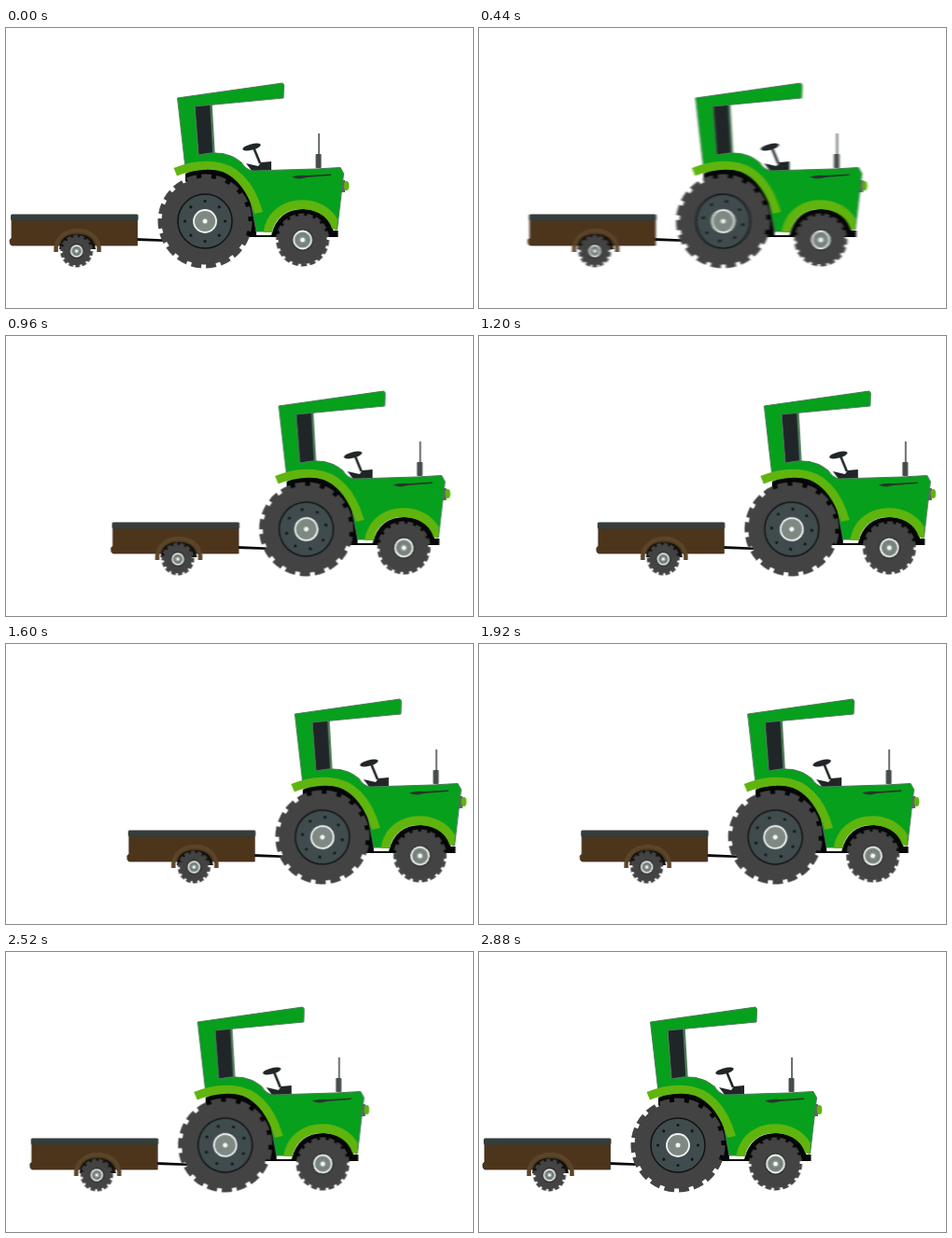
These frames come from a looping animation (500x300 px, 3.12 s). An HTML page:

```html
<!DOCTYPE html>
<html lang="en">
<head>
<meta charset="utf-8">
<title>Tractor</title>
<style>
html, body { margin: 0; width: 100%; height: 100%; overflow: hidden; background: #fff; }
svg { display: block; width: 500px; height: 300px; }
#rig { animation: drive 3120ms infinite; }
.spin { animation: roll 3120ms infinite; transform-origin: 0 0; }
@keyframes drive {
  0% { transform: translateX(0); animation-timing-function: cubic-bezier(.25, .1, .49, 1); }
  46.154%, 50% { transform: translateX(126px); animation-timing-function: cubic-bezier(.364, 0, .636, 1); }
  92.308%, 100% { transform: translateX(0); }
}
@keyframes roll {
  0% { transform: rotate(0); animation-timing-function: cubic-bezier(.25, .1, .49, 1); }
  46.154%, 50% { transform: rotate(var(--turn)); animation-timing-function: cubic-bezier(.364, 0, .636, 1); }
  92.308%, 100% { transform: rotate(0); }
}
.tire { fill: #434343; }
.green { fill: #06a01c; stroke: #4b7a58; stroke-width: 1; stroke-linejoin: round; }
.lime { fill: #60b40e; }
.dark { fill: #202628; }
</style>
</head>
<body>
<svg viewBox="0 0 500 300">
  <filter id="motion" filterUnits="userSpaceOnUse" x="-10" y="40" width="400" height="230"
    color-interpolation-filters="sRGB">
    <feGaussianBlur id="blur" stdDeviation="0 0"/>
  </filter>
  <g id="rig"><g filter="url(#motion)">
    <!-- trailer -->
    <path d="M139 225L172 226.5V229L139 228Z" fill="#080808"/>
    <path d="M6 206H140.500V233H6Q3.500 232 4 227L6 225Z" fill="#4d351b" stroke="#3a2a1c" stroke-width=".8"/>
    <rect x="5" y="199.500" width="136.500" height="7" rx="1.500" fill="#353d3a"/>
    <path d="M57 237Q58 221 76 221Q94 221 96 237Z" fill="#11100e"/>
    <path d="M53.500 240V235C56 211 97 211 99.500 235V240" fill="none" stroke="#5a4529" stroke-width="4.500"/>
    <g id="cart" transform="translate(75.500 239)"></g>

    <!-- chassis and wheel wells -->
    <path d="M192 156Q211 147 232 153Q256 162 267 197L268 222H350V217H355.500V224H255L230 200L192 164Z" fill="#050606"/>
    <path d="M284 222Q291 194 318 194Q345 194 352 222Z" fill="#050606"/>

    <!-- steering -->
    <path d="M257 145L270 148L273 144L284 143V153H263Z" class="dark"/>
    <path d="M265 128L272 145" stroke="#202628" stroke-width="2.600"/>
    <ellipse cx="263" cy="127.500" rx="10" ry="3.200" class="dark" transform="rotate(-14 263 127.500)"/>

    <!-- exhaust -->
    <path d="M335 113V137" stroke="#5b6060" stroke-width="1.800"/>
    <rect x="331.500" y="135" width="6" height="15" rx="1" fill="#464c4c"/>

    <!-- cab and hood -->
    <path d="M202 83L219 82L222 136H206Z" fill="#202628"/>
    <path d="M219.500 82L222.500 135" stroke="#4b7a58" stroke-width="2.500"/>
    <path class="green" d="M183.500 75L296 59L297.500 61L297 75L202 84L206 136
      Q235 129 252 144Q257 152 264 153L331 151L358 149.500L361.500 156L354.500 216
      L340 194Q318 184 296 195L279 218H268L262 186Q246 151 213 149L192 150Z"/>
    <path class="lime" d="M179.500 150Q201 141 221 143Q260 146 275 197L266 199
      Q255 163 232 154Q211 148 183 158.500Z"/>
    <path class="lime" d="M275.500 219C282 176 339 175 355 205L354 217L349 215
      C342 189 292 184 285 219Z"/>
    <path d="M306 159.500Q313 157 322 158L348 156.500V158L322 160Q313 163 306 159.500Z" fill="#27352c"/>
    <path d="M360 163H363V176H359Z" fill="#596660"/>
    <ellipse cx="364.500" cy="169" rx="2.800" ry="5" class="lime"/>

    <g id="rear" transform="translate(213 207)"></g>
    <g id="front" transform="translate(317.500 227)"></g>
  </g></g>
</svg>
<script>
const circle = (r, attrs) => `<circle r="${r}" ${attrs}/>`;

function wheel(id, radius, teeth, hub, rim) {
  const turn = 126 / radius * 180 / Math.PI;
  const depth = radius > 40 ? 5 : 3;
  let parts = circle(radius - depth * .8, 'class="tire"');
  parts += circle(radius - depth / 2, `fill="none" stroke="#434343" stroke-width="${depth}"
    pathLength="${teeth * 10}" stroke-dasharray="6.800 3.200"`);
  if (rim) {
    parts += circle(rim, 'fill="#404b4d" stroke="#101414" stroke-width="1.500"');
    for (let a = 0; a < 360; a += 45)
      parts += `<circle cy="-21.500" r="1.600" fill="#121819" transform="rotate(${a})"/>`;
  } else {
    parts += circle(hub + 2, 'fill="#292d2c"');
  }
  parts += circle(hub, `fill="#7f8983" stroke="#f4f6f4" stroke-width="${hub > 7 ? 1.8 : 1.5}"`);
  if (!rim)
    parts += circle(hub * .62, 'fill="none" stroke="#606a64" stroke-width="1" stroke-dasharray="2 1.500"');
  parts += circle(hub > 7 ? 2.5 : 1.7, 'fill="#f4f6f4"');
  document.getElementById(id).innerHTML =
    `<g class="spin" style="--turn:${turn}deg">${parts}</g>`;
}

wheel('rear', 50.500, 19, 12, 29);
wheel('front', 28.500, 18, 9.5);
wheel('cart', 17.500, 14, 6);

// Horizontal motion blur, strongest mid-trip and gone at the stops
const blur = document.getElementById('blur');
const bump = (t, from, to) =>
  t > from && t < to ? Math.sin(Math.PI * (t - from) / (to - from)) : 0;

function draw() {
  const t = performance.now() % 3120;
  const speed = bump(t, 0, 1200) + bump(t, 1560, 2880);
  blur.setAttribute('stdDeviation', `${speed.toFixed(2)} 0`);
  requestAnimationFrame(draw);
}
draw();
</script>
</body>
</html>
```
